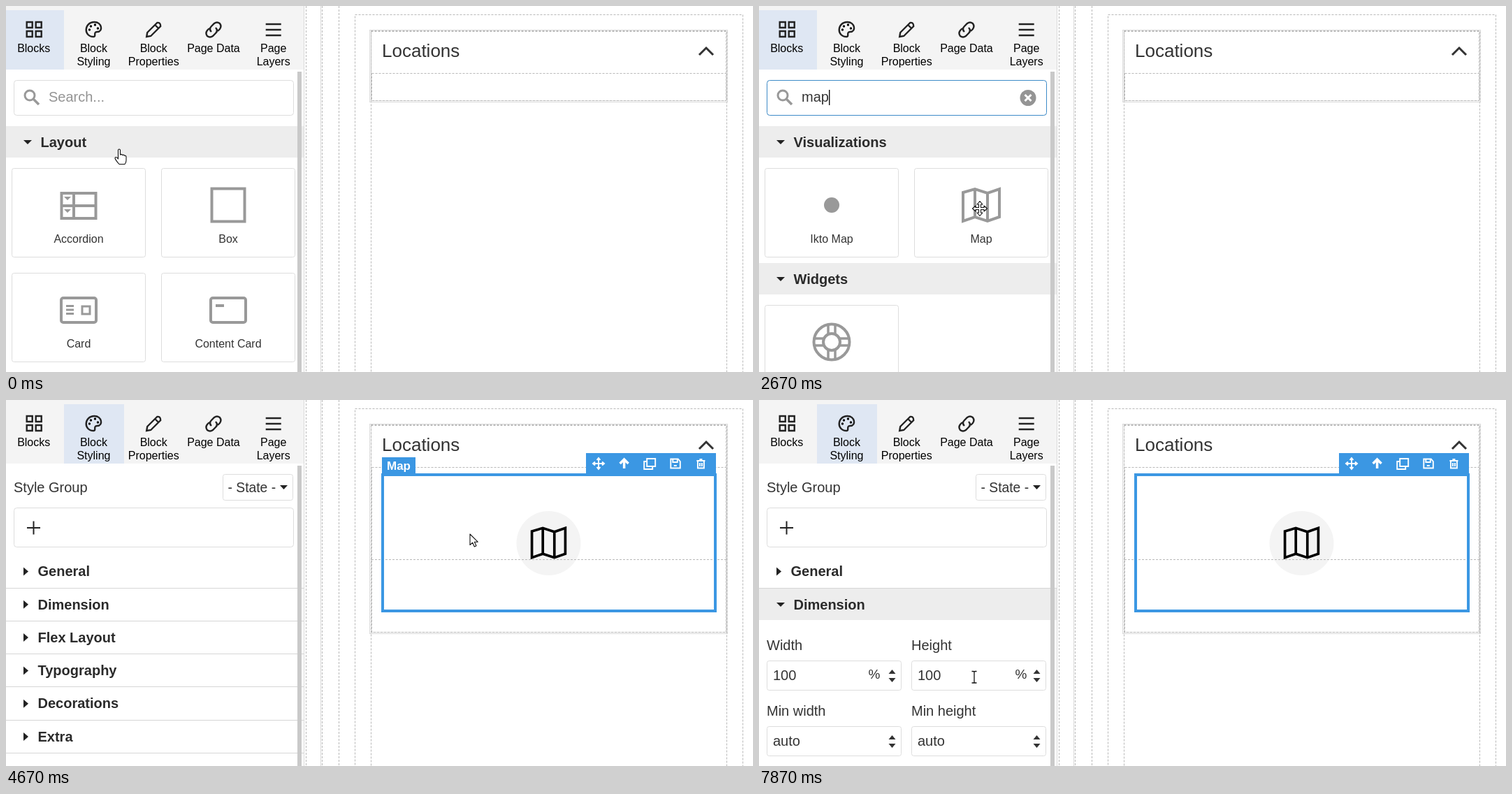
An HTML page that plays this animation: 1069x524 px, repeating every 8000 ms.

```html
<!DOCTYPE html>
<html lang="en">
<head>
<meta charset="utf-8">
<title>Page builder</title>
<style>
  html, body { margin: 0; width: 100%; height: 100%; overflow: hidden; background: #fff; }
  svg { display: block; width: 100%; height: 100%; font-family: "Liberation Sans", Arial, sans-serif; }
  text { fill: #333; font-size: 20px; white-space: pre; }
  .small { font-size: 16px; text-anchor: middle; }
  .tab { fill: #000; }
  .bold { font-weight: bold; fill: #2b2b2b; }
  .box { fill: #fff; stroke: #ddd; }
  .line { fill: none; stroke: currentColor; stroke-width: 4; }
  .dash { fill: none; stroke: #b9b9b9; stroke-dasharray: 3 2; }
  .edge { fill: none; stroke: #d9d9d9; }
  .thin { stroke-width: 2.4; }
  .ptr { fill: #fff; stroke: #111; stroke-width: 1.1; stroke-linejoin: round; }
</style>
</head>
<body>
<svg id="stage" viewBox="0 0 1069 524"></svg>
<script>
const TICK = 1000 / 15, TICKS = 120;

// Everything inside is visible for from <= tick < to.
const during = (from, to, body) => `<g data-from="${from}" data-to="${to}">${body}</g>`;
const at = (x, y, body) => `<g transform="translate(${x} ${y})">${body}</g>`;
const text = (x, y, label, cls = '', extra = '') => `<text x="${x}" y="${y}" class="${cls}" ${extra}>${label}</text>`;
const rect = (x, y, w, h, attrs) => `<rect x="${x}" y="${y}" width="${w}" height="${h}" ${attrs}/>`;
const path = (d, attrs = 'class="line"') => `<path d="${d}" ${attrs}/>`;
const fill = (d, color = '#222') => path(d, `fill="${color}"`);
const circle = (x, y, r, attrs) => `<circle cx="${x}" cy="${y}" r="${r}" ${attrs}/>`;

const frame = rect(-25, -17, 50, 35, 'rx="3" class="line"');
const icons = {
  accordion: rect(-24.5, -17, 49, 36, 'class="line"') + path('M-25 1H25M-7 -17V19') +
    fill('M-21-12h10l-5 5zM-21 6h10l-5 5z', 'currentColor'),
  box: rect(-23.5, -23.5, 47, 47, 'class="line"'),
  card: frame + path('M-18-5.500h11M-18 0h11M-18 5.500h11M5-5h11v11h-11z', 'class="line" style="stroke-width:3"'),
  content: frame + path('M-18-6h12'),
  image: rect(-26.500, -20, 53, 40, 'class="line"') + circle(14, -10, 4, 'class="line" style="stroke-width:3"') +
    path('M-25 15L-8-5L5 10L13 3L25 14', 'class="line" style="stroke-width:5"'),
  map: path('M-26-18L-9-23L9-17L26-23V17L9 23L-9 17L-26 23ZM-9-23V17M9-17V23'),
  globe: circle(0, 0, 11, 'fill="currentColor"'),
  ring: circle(0, 0, 25.500, 'class="line"') + circle(0, 0, 12, 'class="line"') +
    [0, 90, 180, 270].map(a => path('M-5-24V-11M5-24V-11', `class="line" style="stroke-width:3.500" transform="rotate(${a})"`)).join('')
};

const card = (x, y, icon, label) => at(x, y,
  rect(.5, .5, 191, 127, 'rx="3" class="box"') +
  at(96, 53, `<g color="#999">${icons[icon]}</g>`) + text(96, 107, label, 'small'));
const heading = (y, label) => rect(0, y, 426, 45, 'fill="#ededed"') +
  fill(`M25 ${y + 20}h12l-6 6z`) + text(49.500, y + 30, label, 'bold');

function tabs() {
  const names = [['Blocks'], ['Block', 'Styling'], ['Block', 'Properties'], ['Page Data'], ['Page', 'Layers']];
  const marks = [
    'M-10-11h8v8h-8zM3-11h8v8h-8zM-10 2h8v8h-8zM3 2h8v8h-8z',
    'M0 10C-15 10-14-11 1-11C12-11 14 3 5 3C-1 3 4 10 0 10Z',
    'M-10 10l1-6L5-10q5-1 5 5L-4 9zM2-7l5 5',
    'M-3 3q-4-4 0-8l4-4q4-3 8 0q3 4 0 8l-3 3M3-3q4 4 0 8l-4 4q-4 3-8 0q-3-4 0-8l3-3',
    'M-11-8H11M-11 0H11M-11 8H11'];
  const dots = [[-6, 0], [-4, -5], [2, -7], [6, -2]].map(([x, y]) => circle(x, y, 1.700, '')).join('');
  return rect(0, 0, 426, 91, 'fill="#f4f4f4"') +
    during(0, 70, rect(0, 6, 83, 85, 'fill="#dfe7f3"')) +
    during(70, TICKS, rect(83, 6, 86, 85, 'fill="#dfe7f3"')) +
    names.map((rows, i) => {
      const x = 39.700 + i * 85.750;
      return at(x, 34, path(marks[i], 'class="line thin" color="#222"') + (i === 1 ? dots : '')) +
        rows.map((row, j) => text(x, 66 + j * 19, row, 'small tab')).join('');
    }).join('');
}

function search() {
  const field = color => rect(11.500, 106.500, 400, 50, `rx="4" fill="#fff" stroke="${color}"`);
  const caret = x => rect(x, 120, 1.400, 22, 'fill="#111"');
  const typed = [[19, 21, 'm', 77.500], [21, 23, 'ma', 88.500], [23, 70, 'map', 100]];
  return field('#ddd') + during(5, 43, field('#3d8bc8')) +
    circle(34, 128, 7, 'class="line" color="#999" style="stroke-width:3"') +
    path('M39 133l8 8', 'class="line" color="#999" style="stroke-width:3.500"') +
    during(0, 19, text(61, 137, 'Search...', '', 'style="fill:#949494"')) +
    during(5, 13, caret(61.500)) +
    typed.map(([a, b, s, x]) => during(a, b, text(61, 137, s) + during(a, Math.min(b, 31), caret(x)))).join('') +
    during(39, 43, caret(100)) +
    during(19, 70, circle(385, 131.500, 11.500, 'fill="#949494"') +
      path('M380.500 127l9 9m0-9l-9 9', 'class="line" color="#fff" style="stroke-width:3"'));
}

const mapCards = y => heading(y, 'Visualizations') +
  card(8, y + 60, 'globe', 'Ikto Map') + card(222, y + 60, 'map', 'Map');

const blocksPanel = () => search() +
  during(0, 20, heading(172, 'Layout') +
    card(8, 232, 'accordion', 'Accordion') + card(222, 232, 'box', 'Box') +
    card(8, 382, 'card', 'Card') + card(222, 382, 'content', 'Content Card')) +
  during(20, 24, heading(172, 'Basic') + card(8, 232, 'image', 'Image') + mapCards(368)) +
  during(24, 70, mapCards(172) + heading(368, 'Widgets') + card(8, 428, 'ring', ''));

function stylePanel() {
  const section = (label, i) => {
    const y = 245.500 + i * 47.300;
    return fill(`M25 ${y - 6}l7 6l-7 6z`) + text(45.500, y + 6.700, label, 'bold') +
      path(`M0 ${Math.round(y + 23) + .5}H426`, 'stroke="#d6d6d6"');
  };
  const names = ['General', 'Dimension', 'Flex Layout', 'Typography', 'Decorations', 'Extra'];
  const input = (x, y, label, value, unit) => text(x, y, label) +
    rect(x + .5, y + 15.500, 192, 42, 'rx="3" class="box"') + text(x + 9, y + 43, value) +
    (unit ? text(x + 145.500 + (x > 100 ? 3 : 0), y + 41, '%', '', 'style="font-size:19px"') : '') +
    fill(`M${x + 174.500} ${y + 34}l5-6l5 6zM${x + 174.500} ${y + 40}l5 6l5-6z`, '#333');
  return text(11, 132, 'Style Group') +
    rect(310.500, 106.500, 100, 37, 'rx="3" class="box"') +
    text(317.500, 131.500, '- State -', '', 'style="font-size:19.300px"') + fill('M392 122h11l-5.500 6z') +
    rect(11.500, 154.500, 400, 56, 'rx="4" class="box"') +
    path('M30 183H49M39.500 173.500V192.500', 'class="line" color="#222" style="stroke-width:2"') +
    section(names[0], 0) +
    during(70, 93, names.slice(1).map((name, i) => section(name, i + 1)).join('')) +
    during(93, TICKS, heading(270, 'Dimension') +
      input(11, 358, 'Width', '100', true) + input(218, 358, 'Height', '100', true) +
      input(11, 452, 'Min width', 'auto') + input(218, 452, 'Min height', 'auto'));
}

function canvas() {
  const blue = '#3b97e3';
  const accordion = bottom =>
    rect(520.500, 34.500, 512, bottom - 34, 'class="edge"') +
    rect(522.500, 36.500, 508, bottom - 38, 'class="dash"') +
    rect(523.500, 96.500, 507, bottom - 98, 'class="dash"');
  const tools = ['M-7 0H7M0-7V7M-5-2.500L-8 0L-5 2.500M5-2.500L8 0L5 2.500M-2.500-5L0-8L2.500-5M-2.500 5L0 8L2.500 5',
    'M0 7V-5M-6 0L0-6L6 0', 'M-4-7H8V4H-4zM-4-3H-8V8H4V4',
    'M-6.500-6.500H4L7-3V6.500H-6.500zM-3.500-6V-2H3V-6M-2 3h4', 'M-6-4H6M-2-6H2M-4.500-3V6.500H4.500V-3M-1.500-1V4M1.500-1V4'];
  const toolbar = rect(830, 76, 186, 30, `fill="${blue}"`) + tools.map((d, i) =>
    at(848 + i * 36.600, 91, path(d, `class="line" color="#fff" style="stroke-width:${i === 1 ? 3.500 : 1.900}"`))).join('');
  return path('M426.500 0V524M450.500 0V524', 'class="edge"') +
    path('M429.500 0V524M452.500 0V524M476.500 0V524', 'class="dash"') +
    rect(499.500, 12.500, 555, 530, 'class="dash"') + rect(522.500, 35.500, 509, 510, 'class="dash"') +
    text(538, 73, 'Locations', '', 'style="font-size:26px"') +
    path('M992 70L1002 60L1012 70', 'class="line" color="#333" style="stroke-width:3"') +
    during(0, 55, accordion(137)) +
    during(55, TICKS, accordion(334) + circle(776.500, 205, 46, 'fill="#f4f4f4"') +
      at(776.500, 204.500, `<g transform="scale(.92)" color="#000">${icons.map}</g>`) +
      path('M523 228.500H1031', 'class="dash"')) +
    during(49, 55, rect(522.500, 96, 509, 40, 'fill="none" stroke="#f8b250" stroke-width="3"') +
      path('M532 104H1017', 'stroke="#5ec562" stroke-width="4"') +
      fill('M526 97.500l8 6.500l-8 6.500zM1022 97.500l-8 6.500l8 6.500z', '#5ec562')) +
    during(62, 70, rect(539, 106, 476, 196, `fill="none" stroke="${blue}" stroke-width="2"`)) +
    during(62, 79, rect(538, 82, 48, 24, `fill="${blue}"`) +
      text(545, 100, 'Map', '', 'style="font-size:17px;font-weight:bold;fill:#fff"')) +
    during(70, TICKS, rect(539, 107, 476, 195, `fill="none" stroke="${blue}" stroke-width="4"`) + toolbar);
}

const arrow = path('M0 0V15.500L3.700 12.200L6.300 18L9 16.800L6.400 11.200H11.200Z', 'class="ptr"');
const pointers = {
  arrow,
  hand: path('M-1.500 1q1.500-2 3 0V8q2-1.500 3 .5q2-1 3 .7q2.500-.5 2.500 2V16q0 3-2 5.500H0Q-5 16-6 13q0-2.500 3-1l1.500 2z', 'class="ptr"'),
  ibeam: path('M-3.500-8.500H-1Q0-8.500 0-7.500Q0-8.500 1-8.500H3.500M0-7.500V7M-3.500 8H-1Q0 8 0 7Q0 8 1 8H3.500', 'fill="none" stroke="#111" stroke-width="1.300"'),
  move: path([0, 90, 180, 270].map(a => {
    const spin = (x, y) => a === 0 ? [x, y] : a === 90 ? [-y, x] : a === 180 ? [-x, -y] : [y, -x];
    return [[-1.500, -1.500], [-1.500, -6], [-4, -6], [0, -10.500], [4, -6], [1.500, -6]].map(p => spin(...p).join(' ')).join('L');
  }).reduce((d, part) => d + (d ? 'L' : 'M') + part, '') + 'Z', 'class="ptr"'),
  copy: arrow + path('M2 16.500V22H9M9 18V22', 'fill="none" stroke="#111" stroke-dasharray="1 1"') +
    rect(9.500, 19.500, 10, 10, 'fill="#fff" stroke="#111"') + path('M11.500 24.500h6M14.500 21.500v6', 'stroke="#111" stroke-width="1.400"')
};

// [tick, x, y] of the pointer's hot spot
const route = [[0, 162, 205], [5, 128, 119], [6, 128, 119], [9, 128, 128], [30, 128, 128], [40, 316, 290],
  [42, 290, 271], [43, 416, 264], [52, 650, 95], [54, 650, 95], [57, 652, 100], [61, 652, 100], [64, 664, 192],
  [70, 664, 192], [78, 440, 120], [82, 245, 70], [85, 159, 99], [91, 50, 279], [97, 50, 279], [101, 110, 385],
  [104, 190, 450], [106, 235, 437], [109, 283, 397], [112, 283, 397], [116, 322, 397], [118, 308, 397], [120, 308, 397]];
const looks = [[0, 'hand'], [3, 'ibeam'], [32, 'arrow'], [34, 'hand'], [36, 'arrow'], [37, 'move'], [43, 'copy'],
  [55, 'arrow'], [81, 'hand'], [84, 'arrow'], [90, 'hand'], [99, 'arrow'], [108, 'ibeam']];

function pointerAt(tick) {
  const next = route.findIndex(key => key[0] > tick);
  const [t0, x0, y0] = route[next - 1], [t1, x1, y1] = route[next];
  const k = (tick - t0) / (t1 - t0);
  return [x0 + (x1 - x0) * k, y0 + (y1 - y0) * k];
}

const stage = document.getElementById('stage');
stage.innerHTML = canvas() + rect(0, 0, 426, 524, 'fill="#fff"') + tabs() +
  during(0, 70, blocksPanel()) + during(70, TICKS, stylePanel()) +
  rect(417, 94, 6, 430, 'fill="#c9c9c9"') +
  during(43, 55, `<g id="ghost" opacity=".75">${card(0, 0, 'map', 'Map')}</g>`) +
  '<g id="pointer"></g>';
const timed = [...stage.querySelectorAll('[data-from]')];
const ghost = document.getElementById('ghost'), pointer = document.getElementById('pointer');

let shown = -1;
function draw(now) {
  const tick = Math.floor((now + 4) / TICK) % TICKS;
  if (tick !== shown) {
    shown = tick;
    for (const el of timed) {
      el.style.display = tick >= +el.dataset.from && tick < +el.dataset.to ? '' : 'none';
    }
    const [x, y] = pointerAt(tick).map(Math.round);
    pointer.innerHTML = pointers[looks.findLast(look => look[0] <= tick)[1]];
    pointer.setAttribute('transform', `translate(${x} ${y})`);
    ghost.setAttribute('transform', `translate(${x - 61} ${y - 37})`);
  }
}
const start = performance.now();
function loop() {
  draw(performance.now() - start);
  requestAnimationFrame(loop);
}
loop();
</script>
</body>
</html>
```
